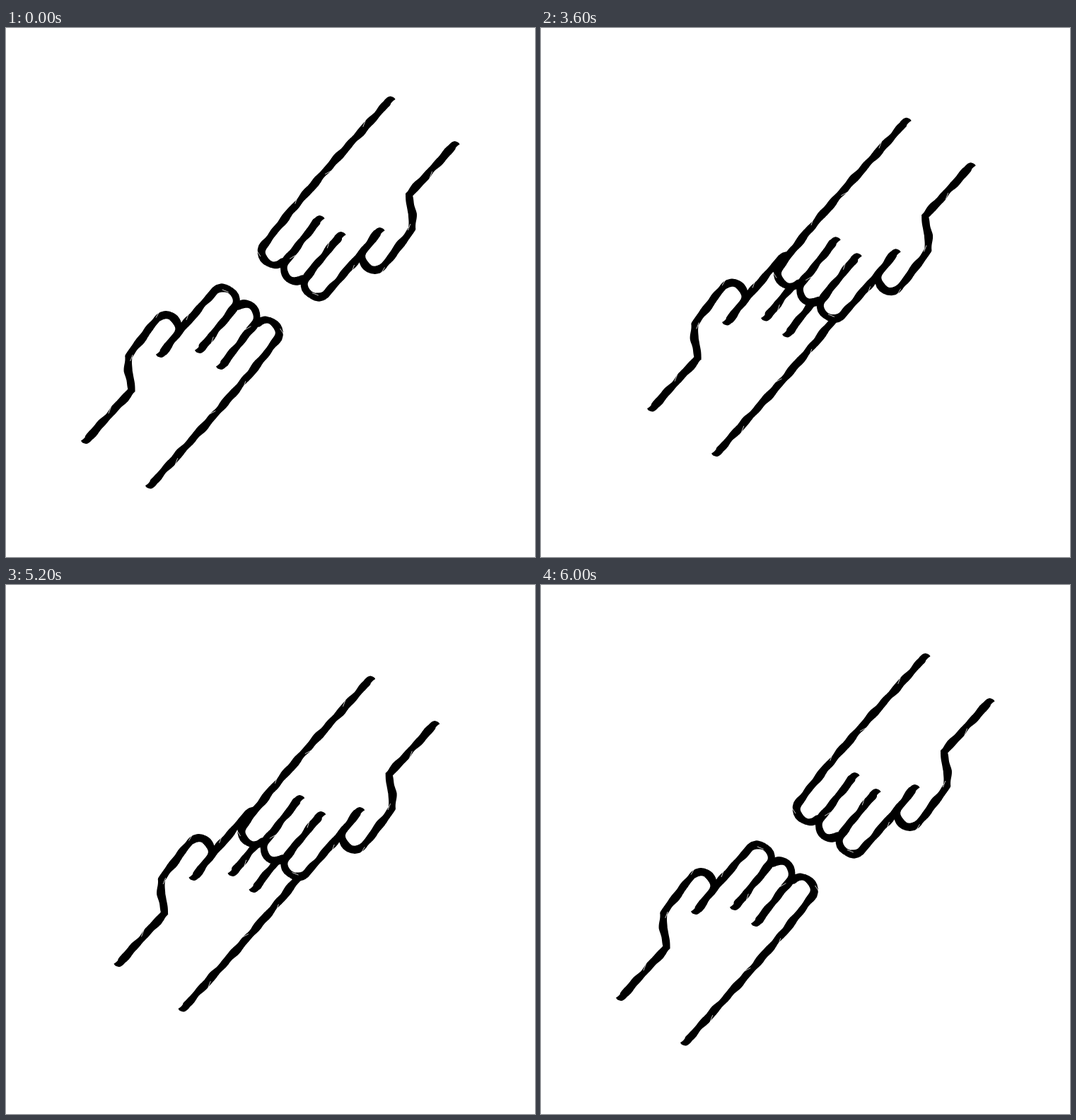
Animation, 748 px wide and 748 px high, one loop 6.2 s. Source, as an HTML page with a canvas:

```html
<!DOCTYPE html>
<html lang="en">
<head>
<meta charset="utf-8">
<title>Helping hands</title>
<style>
  html, body { margin: 0; width: 100%; height: 100%; overflow: hidden; background: #fff; }
  canvas { display: block; width: 748px; height: 748px; }
</style>
</head>
<body>
<canvas id="stage" width="748" height="748"></canvas>
<script>
const ctx = document.getElementById('stage').getContext('2d');
const LOOP = 6200, STEP = 100;

let seed = 11;
function random() {
  seed = (seed * 16807) % 2147483647;
  return seed / 2147483647;
}

// Points round a fingertip, clockwise; angles in degrees
function round(cx, cy, r, from, to = 38) {
  return Array.from({ length: 13 }, (_, i) => {
    const a = (from + (to - from) * i / 12) * Math.PI / 180;
    return [cx + r * Math.cos(a), cy + r * Math.sin(a)];
  });
}

// Open ends of the lines; each line starts a little above its chiselled tip
const ends = { wrist: [113, 584], thumb: [219, 462], index: [274, 456], middle: [304, 479], arm: [204, 647.5] };
const above = ([x, y]) => [x + 4, y - 5];

const corner = [178, 512];
const tips = {
  thumb: round(226, 424, 18, -135),
  index: round(307, 386, 18.5, -142),
  middle: round(337, 408, 18, -120),
  little: round(368, 431, 18, -130)
};
const side = [[173, 485], [173, 464]];
const fork = [250, 423];
const edge = [[345, 489], [293, 549]];

const strokes = [
  [above(ends.wrist), corner],
  [corner, ...side, ...tips.thumb],
  [above(ends.thumb), fork, ...tips.index, above(ends.index)],
  [...tips.middle, above(ends.middle)],
  [...tips.little, ...edge, above(ends.arm)]
];

const ink = new Path2D(), nicks = new Path2D(), skin = new Path2D();

// Stamps discs along a line with a rough, swelling brush; cuts a nick now and then
function addStroke(pts) {
  const phase = random() * 6;
  let s = 0, nextNick = 25 + random() * 40;
  for (let i = 1; i < pts.length; i++) {
    const [ax, ay] = pts[i - 1], [bx, by] = pts[i];
    const len = Math.hypot(bx - ax, by - ay);
    const ux = (bx - ax) / len, uy = (by - ay) / len;
    const n = Math.ceil(len);
    for (let k = 0; k < n; k++) {
      const d = len * k / n, q = s + d;
      const r = 5.4 + 0.5 * Math.sin(q / 9 + phase) + 0.3 * Math.sin(q / 3.7);
      const sway = 0.4 * Math.sin(q / 5.3 + phase);
      const x = ax + ux * d - uy * sway, y = ay + uy * d + ux * sway;
      ink.moveTo(x + r, y);
      ink.arc(x, y, r, 0, Math.PI * 2);
      if (q > nextNick) {
        const flip = random() < 0.5 ? -1 : 1;
        nicks.moveTo(x - uy * 2.5 * flip, y + ux * 2.5 * flip);
        nicks.lineTo(x + ux * 9 - uy * 6 * flip, y + uy * 9 + ux * 6 * flip);
        nextNick += 50 + random() * 50;
      }
    }
    s += len;
  }
}

function addTip([x, y]) {
  ink.moveTo(x - 7, y - 0.5);
  ink.quadraticCurveTo(x - 2, y - 3, x + 1, y - 9);
  ink.lineTo(x + 9, y - 2);
  ink.quadraticCurveTo(x + 4, y + 4, x, y + 4);
  ink.quadraticCurveTo(x - 6, y + 3, x - 7, y - 0.5);
}

// Pointed corner at the wrist
function addCorner([x, y]) {
  ink.moveTo(x - 4, y - 8);
  ink.lineTo(x + 5, y + 2);
  ink.lineTo(x - 4, y + 5);
}

strokes.forEach(addStroke);
Object.values(ends).forEach(addTip);
addCorner(corner);
[ends.wrist, corner, ...side, ...tips.thumb, fork, ...tips.index, ...tips.middle, ...tips.little, ...edge, ends.arm]
  .forEach(([x, y]) => skin.lineTo(x, y));

function drawHand() {
  ctx.fillStyle = ctx.strokeStyle = '#fff';
  ctx.fill(skin);
  ctx.fillStyle = '#000';
  ctx.fill(ink);
  ctx.lineWidth = 0.8;
  ctx.stroke(nicks);
}

// 0 = apart, 1 = clasped
function reach(t) {
  const steps = from => Math.floor((t - from) / STEP) + 1;
  if (t < 3000) return 0;
  if (t < 4800) return Math.min(12, steps(3000)) / 12;
  return Math.max(0, 1 - steps(4800) / 13);
}

function draw(k) {
  ctx.setTransform(1, 0, 0, 1, 0, 0);
  ctx.fillStyle = '#fff';
  ctx.fillRect(0, 0, 748, 748);
  ctx.setTransform(1, 0, 0, 1, 75.6 * k, -78 * k);
  drawHand();
  ctx.setTransform(-1, 0, 0, -1, 747.5 - 46 * k, 748 + 52 * k);
  drawHand();
}

const start = performance.now();
let shown = -1;
function tick() {
  const k = reach((performance.now() - start) % LOOP);
  if (k !== shown) draw(shown = k);
  requestAnimationFrame(tick);
}
tick();
</script>
</body>
</html>
```
